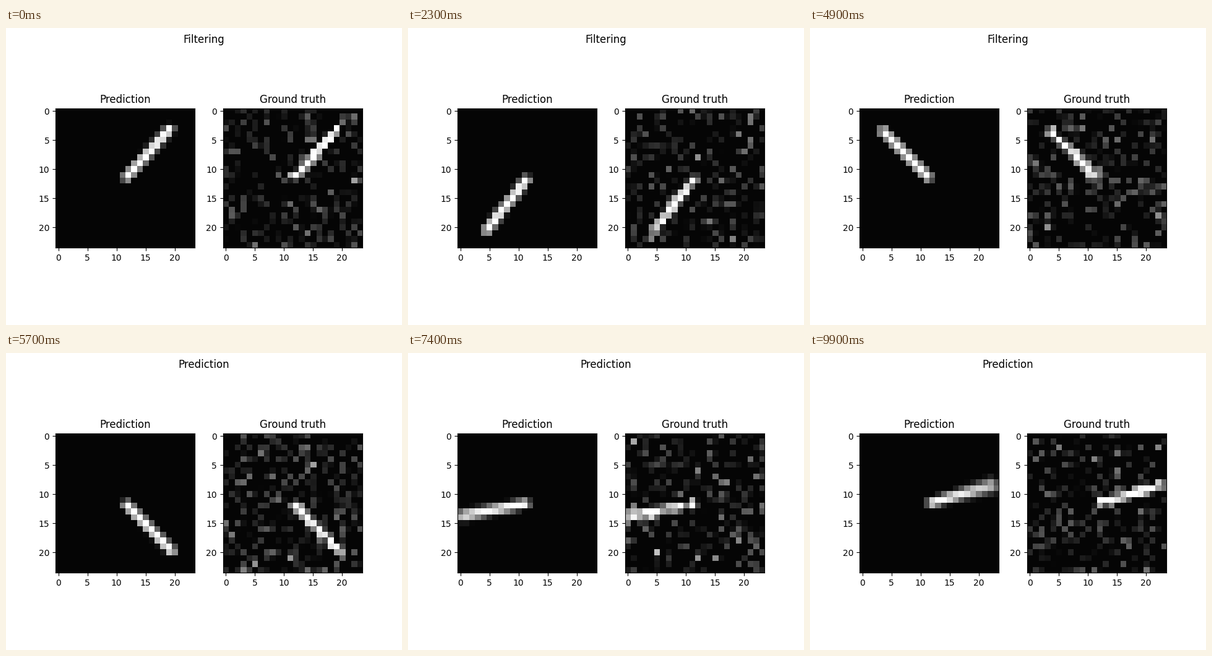
Animation of 640x480 px, one loop 10 s. Source, as a matplotlib script:

```python
import numpy as np
import matplotlib.pyplot as plt
from matplotlib.animation import FuncAnimation

FRAMES = 100
SIZE = 24
PIVOT = (11.5, 11.6)
LENGTH = 11.3
FLOOR = 0.02  # darkest grey of the panels

ys, xs = np.mgrid[:SIZE, :SIZE]


def swing(angle, speed, rate=0.3138, sub=200):
    """Undamped pendulum angle per frame, measured from straight down."""
    path = []
    for _ in range(FRAMES):
        path.append(angle)
        for _ in range(sub):
            speed -= rate**2 * np.sin(angle) / sub
            angle += speed / sub
    return path


def rod_distance(angle):
    dx, dy = np.sin(angle), np.cos(angle)
    px, py = xs - PIVOT[0], ys - PIVOT[1]
    along = np.clip(px * dx + py * dy, 0.35, LENGTH)
    return np.hypot(px - along * dx, py - along * dy)


def predicted(i):
    spread = np.radians(4) * max(0, i - 50) / 50
    rods = [np.clip(1.25 - rod_distance(angles[i] + spread * s), 0, 1)
            for s in (-1, -0.5, 0, 0.5, 1)]
    return np.mean(rods, axis=0)


def observed(i):
    noise = np.random.default_rng(700 + i).normal(-0.07, 0.21, (SIZE, SIZE))
    rod = np.clip(1.4 - 1.25 * rod_distance(angles[i]), 0, 1.15)
    return np.clip(rod + noise, 0, 1)


def shade(img):
    return FLOOR + (1 - FLOOR) * img


angles = swing(np.radians(137.9), 0.0355)

fig, axes = plt.subplots(1, 2, figsize=(6.4, 4.8), dpi=100)
heading = fig.suptitle("Filtering")
panels = []
for ax, name in zip(axes, ("Prediction", "Ground truth")):
    ax.set_title(name)
    panels.append(ax.imshow(np.zeros((SIZE, SIZE)), cmap="gray", vmin=0, vmax=1))


def draw(i):
    heading.set_text("Filtering" if i < FRAMES // 2 else "Prediction")
    panels[0].set_data(shade(predicted(i)))
    panels[1].set_data(shade(observed(i)))
    return [heading, *panels]


anim = FuncAnimation(fig, draw, frames=FRAMES, interval=100, repeat=True,
                     repeat_delay=0, blit=False)
plt.show()
```
